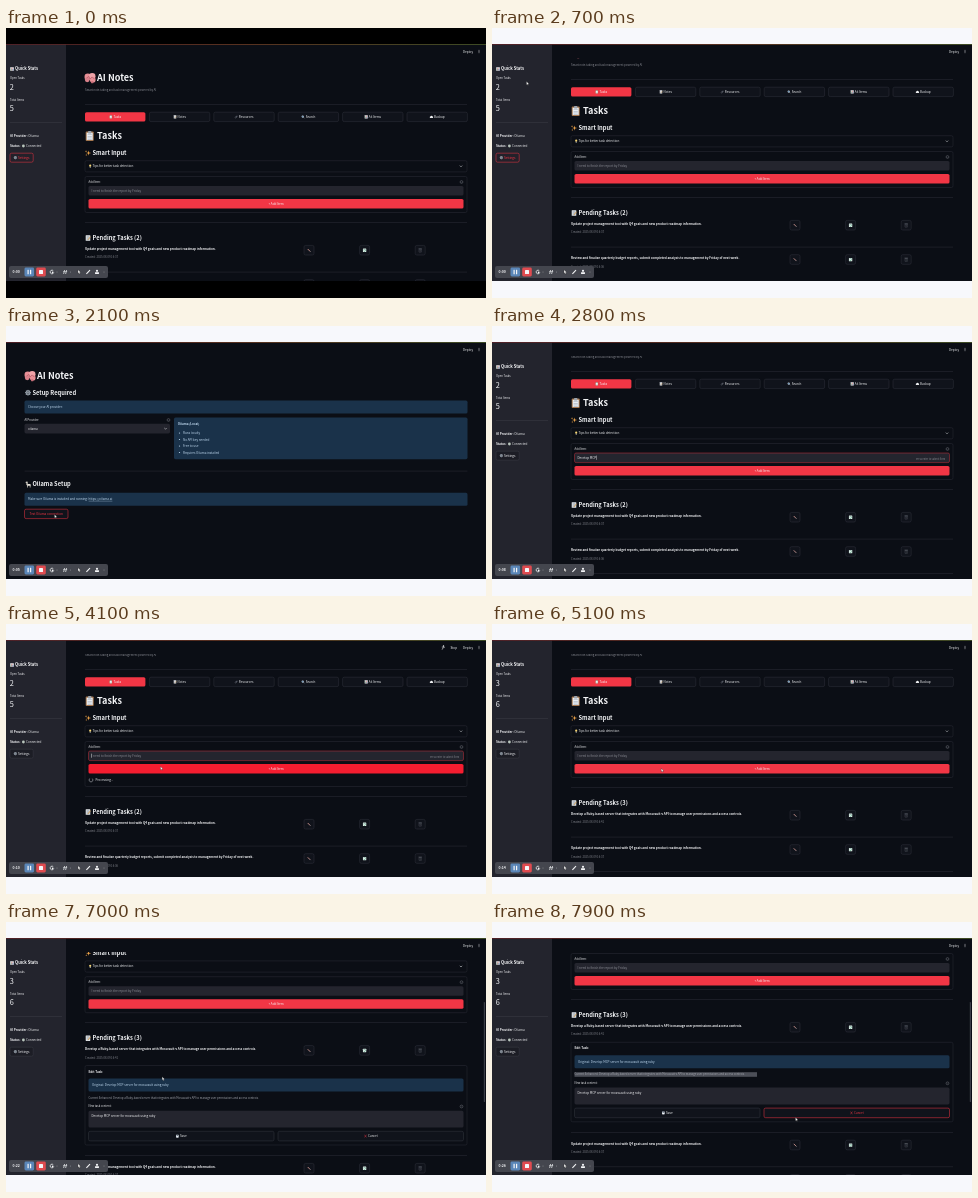
Recreate the animation shown at these times as an HTML page with a canvas. Size 480 by 270 pixels, loop 8 s.

```html
<!DOCTYPE html>
<html lang="en">
<head>
<meta charset="utf-8">
<title>AI Notes</title>
<style>
html, body { margin: 0; width: 100%; height: 100%; overflow: hidden; background: #0b0e15; }
canvas { display: block; width: 480px; height: 270px; }
</style>
</head>
<body>
<canvas id="stage" width="480" height="270"></canvas>
<script>
const ctx = document.getElementById('stage').getContext('2d');
const LOOP = 8000, STEP = 100;
const BG = '#0b0e15', SIDE = '#23242d', LINE = '#2b2d36', FIELD = '#24252e';
const RED = '#f23645', BLUE = '#1a324a', WHITE = '#f5f6f8', GREY = '#8b8d95', PALE = '#c3dcf2';
const FONT = '"Noto Sans CJK JP", "Noto Sans CJK SC", "Noto Sans", sans-serif';
const BASE = 3.05, SMALL = 2.75;
const TYPED = 'Develop MCP server for mossvault using ruby';
const ENHANCED = "Develop a Ruby-based server that integrates with Mossvault's API to manage user permissions and access controls.";
const TASKS = [
  [ENHANCED, '16:41'],
  ['Update project management tool with Q4 goals and new product roadmap information.', '16:37'],
  ['Review and finalize quarterly budget reports, submit completed analysis to management by Friday of next week.', '16:36']
];
const TABS = [['Tasks', 'clip'], ['Notes', 'page'], ['Resources', 'link'], ['Search', 'lens'], ['All Items', 'chart'], ['Backup', 'cloud']];

// Keyed values: [seconds, value...]
const SCROLL = [[0.1, 0], [0.6, 25], [2.3, 25], [2.4, 31], [5.3, 31], [5.8, 59], [6.7, 59], [7.2, 117]];
const CLOCK = [[0, 0], [0.7, 0.5], [1.7, 4], [2.8, 8], [4.1, 10.5], [6.4, 20], [7.9, 26]];
const MOUSE = [[0.6, 44, 17], [0.9, 17, 131], [1.1, 17, 131], [1.6, 49, 190], [2.3, 49, 190], [2.5, 150, 131],
  [3.4, 150, 131], [3.8, 155, 144], [5, 155, 144], [6, 303, 163], [6.4, 305, 167], [6.8, 304, 165],
  [7.1, 83, 152], [7.4, 265, 152], [7.8, 304, 197]];

function keyed(keys, t, i = 1) {
  if (t <= keys[0][0]) return keys[0][i];
  for (let k = 1; k < keys.length; k++) {
    const a = keys[k - 1], b = keys[k];
    if (t <= b[0]) {
      const p = (t - a[0]) / (b[0] - a[0]);
      return a[i] + (b[i] - a[i]) * p;
    }
  }
  return keys[keys.length - 1][i];
}

function box(x, y, w, h, fill, stroke, r = 1.6) {
  ctx.beginPath();
  ctx.roundRect(x, y, w, h, r);
  if (fill) { ctx.fillStyle = fill; ctx.fill(); }
  if (stroke) { ctx.strokeStyle = stroke; ctx.lineWidth = 0.5; ctx.stroke(); }
}

function dot(x, y, r, fill) {
  ctx.beginPath();
  ctx.arc(x, y, r, 0, 7);
  ctx.fillStyle = fill;
  ctx.fill();
}

function path(points, color, width, fill) {
  ctx.beginPath();
  points.forEach(([x, y], i) => i ? ctx.lineTo(x, y) : ctx.moveTo(x, y));
  if (fill) { ctx.closePath(); ctx.fillStyle = fill; ctx.fill(); }
  if (color) { ctx.strokeStyle = color; ctx.lineWidth = width; ctx.stroke(); }
}

const rule = (x, y, w) => { ctx.fillStyle = LINE; ctx.fillRect(x, y, w, 0.5); };
const chevron = (x, y) => path([[x - 1.2, y - 0.6], [x, y + 0.6], [x + 1.2, y - 0.6]], WHITE, 0.5);

// Laid out at ten times the size so that small advances stay exact.
function text(s, x, cy, size = BASE, color = WHITE, bold = false, center = false) {
  ctx.save();
  ctx.font = `${bold ? 700 : 400} ${size * 10}px ${FONT}`;
  const w = ctx.measureText(s).width / 10;
  ctx.translate(center ? x - w / 2 : x, cy + size * 0.34);
  ctx.scale(0.1, 0.1);
  ctx.fillStyle = color;
  ctx.fillText(s, 0, 0);
  ctx.restore();
  return w;
}

// Icons live in a 10 by 10 box around the origin.
const ICONS = {
  brain() {
    dot(-2, -1, 3, '#e88f96'); dot(2, -1.5, 3, '#f0a3a8'); dot(-2.5, 1.6, 2.2, '#d9808a'); dot(2.5, 1.6, 2.6, '#e88f96');
    path([[-3, 0], [-1, -1.5], [0, 1], [2, -1], [4, 1]], '#b45c69', 0.7);
    box(1, 3, 2, 1.8, '#c76d78', null, 0.5);
  },
  clip() {
    box(-4, -4.5, 8, 9.5, '#a5774f', null, 1); box(-3, -3.2, 6, 7.2, '#e9edf2', null, 0.2);
    box(-1.6, -5, 3.2, 2.4, '#9aa3ad', null, 0.5);
    for (let y = -1.5; y < 3.5; y += 1.6) box(-2.1, y, 4.2, 0.5, '#9aa5b2', null, 0);
  },
  page() {
    box(-3.7, -4.5, 7.4, 9, '#e6e9ec', null, 0.6);
    for (let y = -3; y < 3; y += 1.8) box(-2.4, y, 4.8, 0.7, '#7f8994', null, 0);
    path([[0, 3], [4, -2]], '#d69a45', 1.4);
  },
  note() {
    box(-4, -4, 8, 8, '#dce9e4', null, 0.8); box(-2.5, -2.4, 5, 1, '#4b8b78', null, 0);
    path([[-2, 1], [-0.5, 2.6], [3, -0.5]], '#36a072', 1.3);
  },
  link() {
    ctx.rotate(-0.7);
    box(-5, -1.6, 5, 3.2, null, '#aeb9c4', 1.6); box(-0.5, -1.6, 5, 3.2, null, '#aeb9c4', 1.6);
    path([[-2, 0], [2, 0]], '#cdd4da', 1);
  },
  lens() { path([[0, 0], [4, 4]], '#aeb9c4', 1.6); dot(-1, -1, 3.3, '#c8d8e6'); dot(-1, -1, 2, '#5d8bb0'); },
  chart() {
    box(-4.5, -4.5, 9, 9, '#e8ecf0', null, 0.5);
    box(-3, -1, 1.6, 4.5, '#54a06c', null, 0); box(-0.8, -3.2, 1.6, 6.7, '#d45454', null, 0); box(1.5, 0, 1.6, 3.5, '#4e83c4', null, 0);
  },
  cloud() { dot(-2.5, 1, 2.3, WHITE); dot(0.3, -0.5, 3, WHITE); dot(3, 1.1, 2.2, WHITE); box(-3, 1, 6, 2.3, WHITE, null, 0); },
  spark() {
    const star = (x, y, r) => path([0, 1, 2, 3, 4, 5, 6, 7].map(i => {
      const d = i % 2 ? r * 0.3 : r, a = i * Math.PI / 4;
      return [x + d * Math.cos(a), y + d * Math.sin(a)];
    }), null, 0, '#f0a64a');
    star(1, 0, 4.4); star(-3.4, -3, 2); star(-3, 3.4, 1.8);
  },
  bulb() { dot(0, -1.5, 3, '#f7d774'); box(-1.3, 1.3, 2.6, 3.2, '#c9ced4', null, 0.5); },
  gear() {
    for (let i = 0; i < 8; i++) dot(4 * Math.cos(i * Math.PI / 4), 4 * Math.sin(i * Math.PI / 4), 1, '#9aa4ae');
    dot(0, 0, 3.9, '#9aa4ae'); dot(0, 0, 2.4, '#59616b'); dot(0, 0, 1.1, '#b4bcc4');
  },
  pencil() { path([[-3, -3], [2.5, 2.5]], '#e4a59c', 2); path([[2, 2], [3.6, 3.6]], '#e6e9ec', 1); },
  trash() { box(-3, -2.5, 6, 7, null, '#8f959d', 0.6); path([[-4, -3.5], [4, -3.5]], '#8f959d', 1); path([[0, -1], [0, 3]], '#8f959d', 0.8); },
  llama() {
    box(-1.5, -1, 6, 3, '#e9e4da', null, 1.3); box(-2.6, -4.8, 2, 6, '#e9e4da', null, 0.8);
    box(-4, -4.4, 2.4, 1.6, '#e9e4da', null, 0.6); box(-1.2, 1, 1.1, 3.8, '#e9e4da', null, 0); box(3, 1, 1.1, 3.8, '#e9e4da', null, 0);
  },
  save() { box(-4, -4, 8, 8, '#c5ced8', null, 0.8); box(-2, -4, 4, 3, '#55606c', null, 0); box(-2.5, 0.5, 5, 3.5, WHITE, null, 0); },
  cross() { path([[-3, -3], [3, 3]], RED, 1.6); path([[3, -3], [-3, 3]], RED, 1.6); }
};

function icon(name, x, y, size) {
  ctx.save();
  ctx.translate(x, y);
  ctx.scale(size / 10, size / 10);
  ICONS[name]();
  ctx.restore();
}

function button(x, y, w, h, label, glyph, fill, stroke, color = WHITE) {
  box(x, y, w, h, fill, stroke);
  ctx.font = `400 ${BASE * 10}px ${FONT}`;
  const lead = glyph ? 4.2 : 0, total = lead + ctx.measureText(label).width / 10;
  const left = x + w / 2 - total / 2;
  if (glyph) icon(glyph, left + 1.6, y + h / 2, 3.4);
  text(label, left + lead, y + h / 2, BASE, color);
}

function help(x, y) {
  ctx.beginPath();
  ctx.arc(x, y, 1.4, 0, 7);
  ctx.strokeStyle = GREY;
  ctx.lineWidth = 0.4;
  ctx.stroke();
  text('?', x, y, 2, GREY, false, true);
}

function sidebar(s) {
  ctx.fillStyle = SIDE;
  ctx.fillRect(0, 16, 60, 237);
  icon('chart', 6, 41, 4);
  text('Quick Stats', 9, 41, 4.15, WHITE, true);
  text('Open Tasks', 4, 50, SMALL);
  text(s.added ? '3' : '2', 3.8, 59, 7.4);
  text('Total Items', 4, 72, SMALL);
  text(s.added ? '6' : '5', 3.8, 80.5, 7.4);
  ctx.fillStyle = '#3b3c45';
  ctx.fillRect(4, 94, 52, 0.5);
  text('Ollama', 4 + text('AI Provider: ', 4, 108, BASE, WHITE, true), 108);
  text('Status:', 4, 118, BASE, WHITE, true);
  dot(17.4, 118, 1.4, '#b9c6bd');
  text('Connected', 20, 118);
  const hot = s.t < 1;
  button(4, 125.2, 23.2, 9, 'Settings', 'gear', hot ? '#23212a' : '#1c1d25', hot ? RED : '#3c3e47', hot ? RED : WHITE);
}

function entryForm(s) {
  const extra = s.busy ? 9 : 0;
  box(79, 148.5, 382, 36 + extra, null, LINE);
  text('Add Item:', 82.5, 154, SMALL);
  help(455.5, 154);
  box(82.5, 158, 375, 9.6, FIELD, s.focus ? '#c4303d' : null);
  if (s.typed) text(s.typed, 85.5, 162.7);
  else text('I need to finish the report by Friday', 85.5, 162.7, BASE, GREY);
  if (s.focus) {
    ctx.font = `400 ${BASE * 10}px ${FONT}`;
    ctx.fillStyle = WHITE;
    ctx.fillRect(85.5 + ctx.measureText(s.typed).width / 10, 160.6, 0.4, 4.2);
    text('Press Enter to submit form', 424, 164.6, 2.35, GREY);
  }
  button(82.5, 171, 375, 9.6, '+ Add Item', null, s.busy ? '#f51d30' : RED);
  if (s.busy) {
    const a = s.t * 9;
    ctx.beginPath();
    ctx.arc(85, 187, 1.9, a, a + 4.9);
    ctx.strokeStyle = '#c8cad0';
    ctx.lineWidth = 0.5;
    ctx.stroke();
    text('Processing...', 89.5, 187);
  }
  return extra;
}

function editForm(y, s) {
  box(79, y + 16.5, 382, 79.5, null, LINE);
  text('Edit Task:', 82.5, y + 22.5, BASE, WHITE, true);
  box(82.5, y + 29.5, 375, 13, BLUE);
  text('Original: ' + TYPED, 86, y + 36, BASE, PALE);
  const sel = Math.max(0, Math.min(1, (s.t - 7.1) / 0.3));
  ctx.fillStyle = '#4c4f58';
  ctx.fillRect(82.5, y + 46.4, 182.5 * sel, 4.6);
  text('Current Enhanced: ' + ENHANCED, 82.5, y + 48.7, SMALL, '#a3a6ae');
  text('New task content:', 82.5, y + 57.5, SMALL);
  help(455.5, y + 57.5);
  box(82.5, y + 61.8, 375, 16.8, FIELD);
  text(TYPED, 85.5, y + 67);
  const hot = s.t > 7.65;
  button(82.5, y + 82.3, 185.5, 9.6, 'Save', 'save', '#10131b', '#353841');
  button(272, y + 82.3, 185.5, 9.6, 'Cancel', 'cross', '#10131b', hot ? RED : '#353841', hot ? RED : WHITE);
}

function taskRow(y, [title, time], hot) {
  text(title, 79, y, BASE, WHITE, true);
  text('Created: 2025-08-09 ' + time, 79, y + 8.7, SMALL, GREY);
  ['pencil', 'note', 'trash'].forEach((name, i) => {
    const x = 303 + i * 55.6;
    box(x - 5, y - 3.4, 10, 9.6, '#10131b', hot && !i ? RED : '#30333c');
    icon(name, x, y + 1.5, 4.2);
  });
}

function mainPage(s) {
  ctx.save();
  ctx.beginPath();
  ctx.rect(60, 30, 420, 223);
  ctx.clip();
  ctx.translate(0, -s.scroll);
  icon('brain', 84, 50, 11);
  text('AI Notes', 91, 50, 9.1, WHITE, true);
  text('Smart note-taking and task management powered by AI', 79, 62.5, SMALL, GREY);
  rule(79, 76, 382);
  TABS.forEach(([label, glyph], i) =>
    button(79 + i * 64.4, 84.2, 60.4, 9.4, label, glyph, i ? '#10131b' : RED, i ? '#30333c' : null));
  icon('clip', 83.7, 108, 10);
  text('Tasks', 91, 108, 9.1, WHITE, true);
  icon('spark', 82, 125, 5.8);
  text('Smart Input', 86.4, 125, 5.75, WHITE, true);
  box(79, 132.7, 382, 11.2, null, LINE);
  icon('bulb', 84.2, 138.2, 3.6);
  text('Tips for better task detection', 86.5, 138.2);
  chevron(455, 138.2);
  const extra = entryForm(s);
  rule(79, 194.3 + extra, 382);
  icon('page', 82, 210 + extra, 6.2);
  text(`Pending Tasks (${s.added ? 3 : 2})`, 86.5, 210 + extra, 5.75, WHITE, true);
  let y = 220.8 + extra;
  TASKS.slice(s.added ? 0 : 1).forEach((task, i) => {
    taskRow(y, task, s.hover && !i);
    if (s.editing && !i) { editForm(y, s); y += 83.5; }
    rule(79, y + 23, 382);
    y += 34.3;
  });
  if (s.hover) {
    box(294.5, 207.5, 17.5, 7.6, '#262832', null, 1.4);
    text('Edit task', 303.2, 211.3, SMALL, WHITE, false, true);
  }
  ctx.restore();
  sidebar(s);
  if (s.t > 6.6) box(477.8, 80, 1.2, 100, '#3c3f48', null, 0.6);
}

function setupPage() {
  icon('brain', 24, 50, 11);
  text('AI Notes', 31, 50, 9.1, WHITE, true);
  icon('gear', 22, 66.7, 6);
  text('Setup Required', 26.4, 66.7, 5.75, WHITE, true);
  box(18.5, 74.6, 443, 13, BLUE);
  text('Choose your AI provider:', 22, 81, BASE, PALE);
  text('AI Provider:', 18.5, 94, SMALL);
  help(162.5, 94);
  box(18.5, 97.8, 145.5, 9.6, FIELD);
  text('ollama', 22, 102.6);
  chevron(159.5, 102.6);
  box(168, 91.6, 293.5, 41.6, BLUE);
  text('Ollama (Local)', 171.7, 98, BASE, PALE, true);
  ['Runs locally', 'No API key needed', 'Free to use', 'Requires Ollama installed'].forEach((line, i) => {
    const y = 107 + i * 6.5;
    dot(173.5, y, 0.6, PALE);
    text(line, 177, y, BASE, PALE);
  });
  rule(18.5, 144.8, 443);
  icon('llama', 22, 158.5, 6);
  text('Ollama Setup', 26.4, 158.5, 5.75, WHITE, true);
  box(18.5, 166.8, 443, 13, BLUE);
  const x = 22 + text('Make sure Ollama is installed and running: ', 22, 173.2, BASE, PALE);
  const w = text('https://ollama.ai', x, 173.2, BASE, PALE);
  ctx.fillStyle = PALE;
  ctx.fillRect(x, 174.9, w, 0.3);
  button(18.5, 183.2, 43.5, 9.4, 'Test Ollama connection', null, '#10131b', RED, RED);
}

function header(s) {
  text('Deploy', 457, 23.5);
  for (let i = -1; i < 2; i++) dot(473, 23.5 + i * 1.3, 0.45, WHITE);
  if (s.busy) {
    text('Stop', 444.5, 23.5);
    dot(437.5, 21.9, 0.7, WHITE);
    const k = Math.sin(s.t * 12);
    path([[437.5, 22.5], [437, 24], [437 + k, 25.6]], WHITE, 0.6);
    path([[435.8, 23], [437.3, 22.9], [439, 23.4]], WHITE, 0.5);
  }
  const g = ctx.createLinearGradient(0, 0, 480, 0);
  g.addColorStop(0, '#5a2026');
  g.addColorStop(0.5, '#6b3a22');
  g.addColorStop(1, '#4a5a28');
  ctx.fillStyle = g;
  ctx.fillRect(0, 16, 480, 0.8);
}

function recorder(s) {
  box(3, 238, 99, 12, '#44464e', null, 2);
  text('0:' + String(Math.floor(keyed(CLOCK, s.t))).padStart(2, '0'), 6.6, 244, 3.5, WHITE, true);
  box(18.5, 239.6, 9.6, 8.8, '#5a86b8', null, 1.4);
  box(21.5, 241.8, 1.2, 4.4, WHITE, null, 0.3);
  box(24, 241.8, 1.2, 4.4, WHITE, null, 0.3);
  box(30.2, 239.6, 9.6, 8.8, '#e04b50', null, 1.4);
  box(33, 242, 4, 4, WHITE, null, 0.6);
  ctx.beginPath();
  ctx.arc(46, 244, 1.8, 0.3, 5.5);
  ctx.strokeStyle = WHITE;
  ctx.lineWidth = 0.8;
  ctx.stroke();
  dot(46.6, 244.4, 0.8, WHITE);
  [51, 64.5, 98].forEach(x => dot(x, 244, 0.5, '#8a8c94'));
  path([[57.6, 246], [58.6, 242]], WHITE, 0.7);
  path([[59.6, 246], [60.6, 242]], WHITE, 0.7);
  path([[57, 243.6], [61.2, 243.6]], WHITE, 0.5);
  pointer(72, 241.8, 0.9);
  path([[80.4, 245.8], [84, 242.2]], WHITE, 1.1);
  dot(91, 242.8, 1.1, WHITE);
  box(89, 244.2, 4, 1.8, WHITE, null, 0.4);
}

function pointer(x, y, k = 1) {
  path([[0, 0], [0, 4.2], [1, 3.3], [1.8, 4.8], [2.5, 4.4], [1.8, 3], [3, 2.9]].map(p => [x + p[0] * k, y + p[1] * k]), '#222', 0.3, '#fff');
}

function stateAt(t) {
  const count = Math.floor(Math.max(0, t - 2.5) * 37 + 0.01);
  return {
    t,
    scroll: keyed(SCROLL, t),
    setup: t >= 1.05 && t < 2.35,
    typed: t < 3.85 ? TYPED.slice(0, count) : '',
    focus: t >= 2.45 && t < 5.05,
    busy: t >= 3.85 && t < 5.05,
    added: t >= 5.05,
    hover: t >= 6.05 && t < 6.55,
    editing: t >= 6.55,
    mouse: (t >= 0.55 && t < 2.55) || t >= 3.55
  };
}

function draw(t) {
  const s = stateAt(t);
  ctx.fillStyle = t < 0.1 ? '#000' : '#f7f8fc';
  ctx.fillRect(0, 0, 480, 270);
  ctx.fillStyle = BG;
  ctx.fillRect(0, 16, 480, 237);
  if (s.setup) setupPage(); else mainPage(s);
  header(s);
  recorder(s);
  if (s.mouse) pointer(keyed(MOUSE, t, 1) - 0.5, keyed(MOUSE, t, 2) - 1.5, 0.8);
}

function tick(now) {
  draw(Math.floor((now % LOOP) / STEP) * STEP / 1000);
  requestAnimationFrame(tick);
}
draw(0);
requestAnimationFrame(tick);
</script>
</body>
</html>
```
